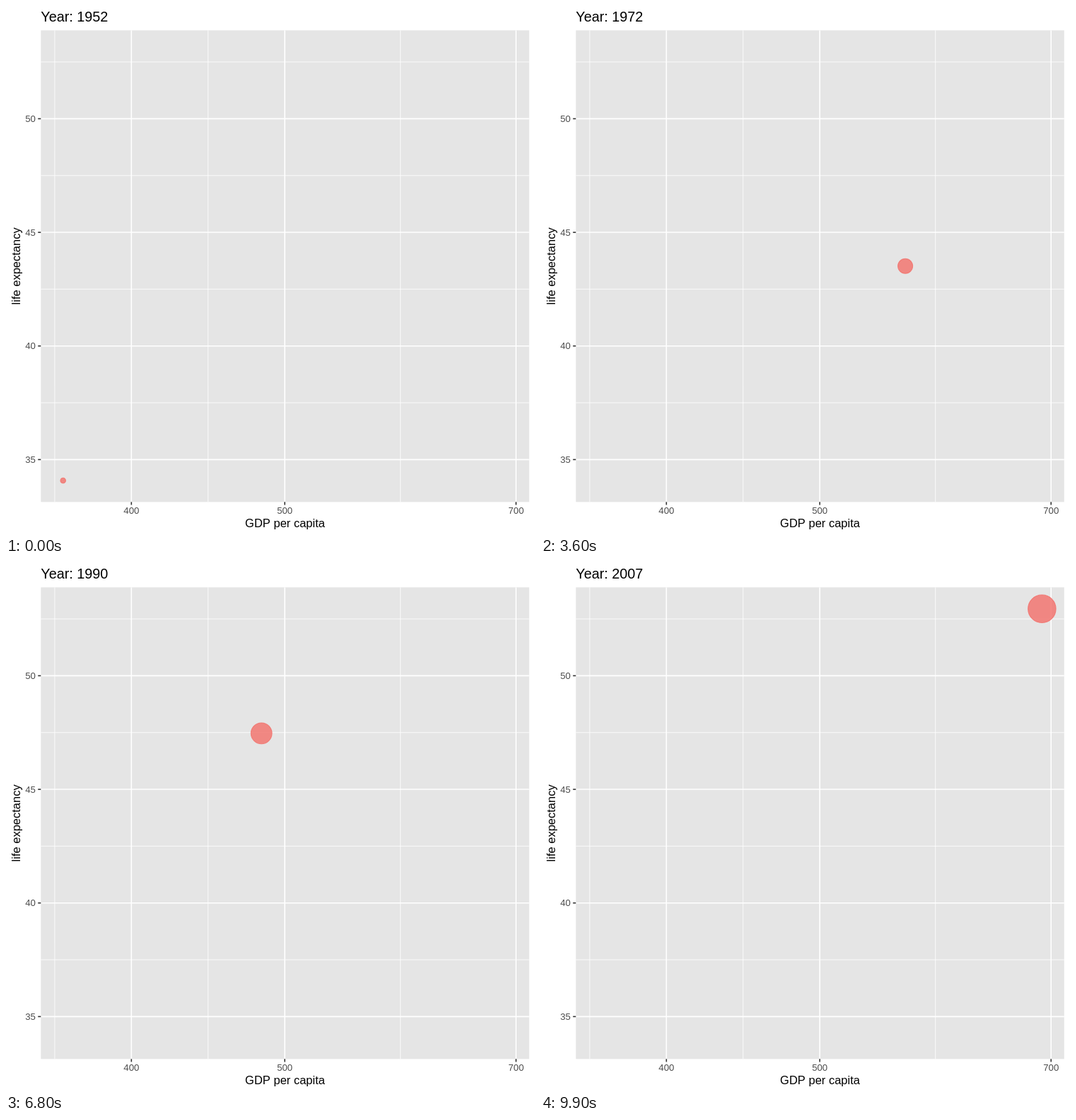
An HTML page with a canvas for the animation above (10 s loop, 748x748 px).

```html
<!DOCTYPE html>
<html lang="en">
<head>
<meta charset="utf-8">
<title>Life expectancy and GDP per capita</title>
<style>
  html, body { margin: 0; width: 100%; height: 100%; overflow: hidden; background: #fff; }
  canvas { display: block; }
</style>
</head>
<body>
<canvas id="stage" width="748" height="748"></canvas>
<script>
const ctx = document.getElementById('stage').getContext('2d');

const STEP = 100, COUNT = 100;
const FIRST_YEAR = 1952, LAST_YEAR = 2007, GAP = 5;
const FONT = '"Liberation Sans", Arial, Helvetica, sans-serif';
const panel = { left: 49.3, right: 739.75, top: 34.4, bottom: 701.3 };

// One row every five years: GDP per capita, life expectancy, population in millions.
const rows = [
  [362.146, 34.078, 20.861], [378.904, 36.667, 22.816],
  [419.456, 40.059, 25.145], [516.119, 42.115, 27.860],
  [566.244, 43.515, 30.770], [556.808, 44.510, 34.618],
  [577.861, 44.916, 38.112], [573.741, 46.684, 43.000],
  [421.353, 48.091, 52.089], [515.889, 49.402, 59.861],
  [530.053, 50.725, 67.947], [690.806, 52.947, 76.512]
];

// Linear scale with 5% padding at both ends.
function scale(lo, hi, from, to) {
  const pad = (hi - lo) * 0.05;
  return v => from + (v - lo + pad) / (hi - lo + 2 * pad) * (to - from);
}

const first = rows[0], last = rows[rows.length - 1];
const logX = scale(Math.log(first[0]), Math.log(last[0]), panel.left, panel.right);
const yAt = scale(first[1], last[1], panel.bottom, panel.top);
const xAt = gdp => logX(Math.log(gdp));

// Point area follows population; sizes run from 2 to 12 mm.
function radius(pop) {
  const share = Math.sqrt((pop - first[2]) / (last[2] - first[2]));
  const size = 2 + 10 * share;
  return (size * 2.845 + 0.945) * 0.5625;
}

const points = rows.map(([gdp, life, pop]) => [xAt(gdp), yAt(life), radius(pop)]);

const xMajor = [400, 500, 700].map(xAt);
const xMinor = [(3 * xMajor[0] - xMajor[1]) / 2,
                (xMajor[0] + xMajor[1]) / 2,
                (xMajor[1] + xMajor[2]) / 2];
const yMajor = [35, 40, 45, 50];
const yMinor = [37.5, 42.5, 47.5, 52.5];

function line(x1, y1, x2, y2, color, width) {
  ctx.strokeStyle = color;
  ctx.lineWidth = width;
  ctx.beginPath();
  ctx.moveTo(x1, y1);
  ctx.lineTo(x2, y2);
  ctx.stroke();
}

function text(str, x, y, size, color, align) {
  ctx.font = size + 'px ' + FONT;
  ctx.fillStyle = color;
  ctx.textAlign = align;
  ctx.fillText(str, x, y);
}

const vertical = (x, width) => line(x, panel.top, x, panel.bottom, '#fff', width);
const horizontal = (y, width) => line(panel.left, y, panel.right, y, '#fff', width);

function drawPanel() {
  const { left, right, top, bottom } = panel;
  ctx.fillStyle = '#fff';
  ctx.fillRect(0, 0, 748, 748);
  ctx.fillStyle = '#e5e5e5';
  ctx.fillRect(left, top, right - left, bottom - top);
  xMinor.forEach(x => vertical(x, 0.8));
  yMinor.forEach(v => horizontal(yAt(v), 0.8));
  xMajor.forEach(x => vertical(x, 1.6));
  yMajor.forEach(v => horizontal(yAt(v), 1.6));
}

function drawAxes() {
  const { left, right, top, bottom } = panel;
  xMajor.forEach((x, i) => {
    line(x, bottom, x, bottom + 4.1, '#333', 1.6);
    text(String([400, 500, 700][i]), x, 718.2, 13.2, '#4d4d4d', 'center');
  });
  yMajor.forEach(v => {
    const y = yAt(v);
    line(left - 4.1, y, left, y, '#333', 1.6);
    text(String(v), left - 7.4, y + 4.7, 13.2, '#4d4d4d', 'right');
  });
  text('GDP per capita', (left + right) / 2, 736.7, 16.5, '#000', 'center');
  ctx.save();
  ctx.translate(19.8, (top + bottom) / 2);
  ctx.rotate(-Math.PI / 2);
  text('life expectancy', 0, 0, 16.5, '#000', 'center');
  ctx.restore();
}

function drawPoint(year) {
  const pos = (year - FIRST_YEAR) / GAP;
  const i = Math.min(Math.floor(pos), points.length - 2);
  const mix = pos - i;
  const [x, y, r] = points[i].map((v, k) => v + (points[i + 1][k] - v) * mix);
  ctx.beginPath();
  ctx.arc(x, y, r, 0, Math.PI * 2);
  ctx.fillStyle = ctx.strokeStyle = 'rgba(243, 111, 105, 0.8)';
  ctx.lineWidth = 1.06;
  ctx.fill();
  ctx.stroke();
}

function draw(now) {
  const tick = Math.floor(now / STEP) % COUNT;
  const year = FIRST_YEAR + (LAST_YEAR - FIRST_YEAR) * tick / (COUNT - 1);
  drawPanel();
  drawPoint(year);
  drawAxes();
  text('Year: ' + Math.round(year), panel.left, 22.3, 19.8, '#000', 'left');
}

let start = null;
function loop(now) {
  if (start === null) start = now;
  draw(now - start);
  requestAnimationFrame(loop);
}
draw(0);
requestAnimationFrame(loop);
</script>
</body>
</html>
```
